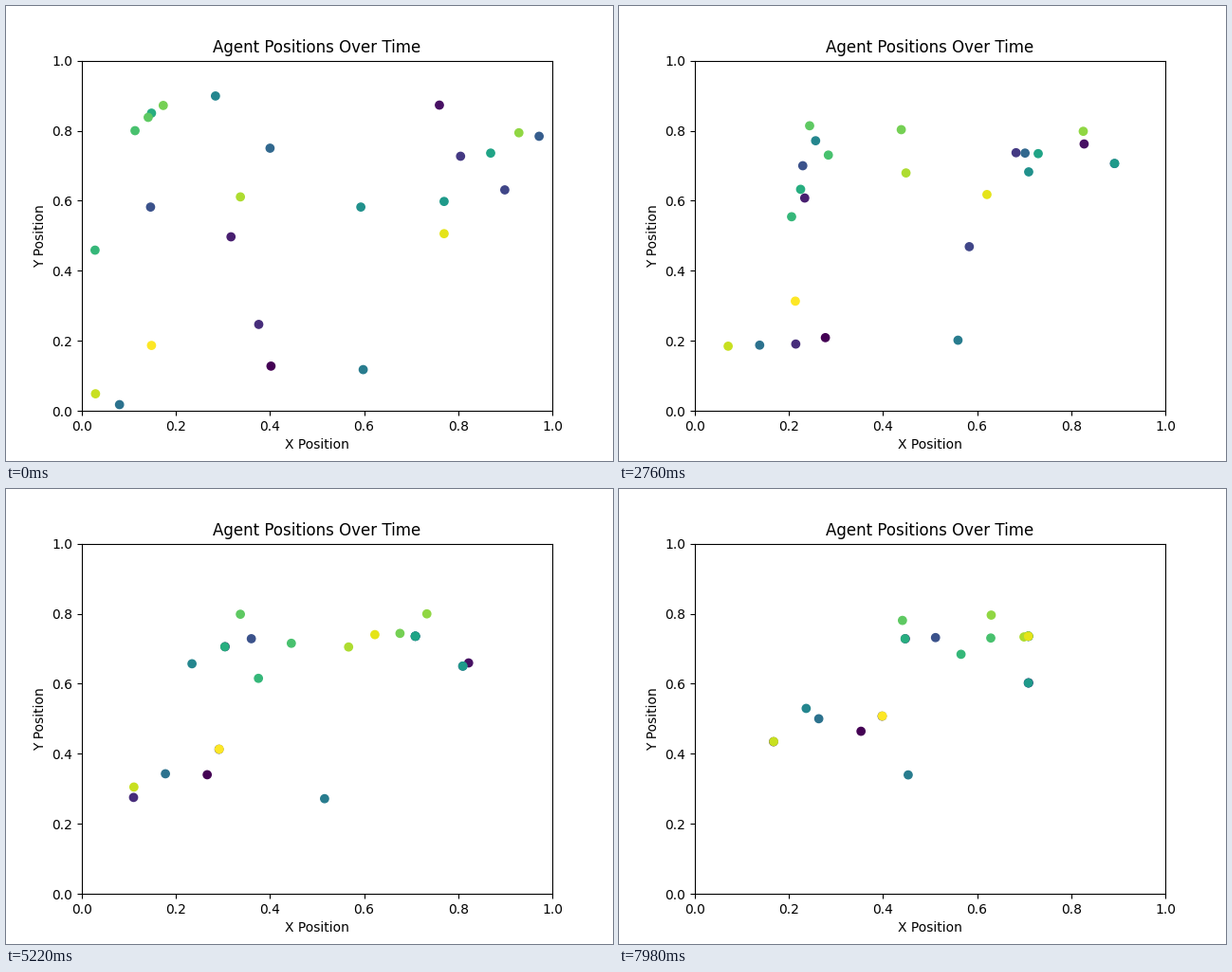
A matplotlib script for the animation above (8000 ms loop, 640 by 480 pixels).

```python
import numpy as np
import matplotlib.pyplot as plt
from matplotlib.animation import FuncAnimation

STEP_MS = 60      # time between two moves
TICK_MS = 40
LOOP_MS = 8000
STEPS = 134
SUBSTEPS = 6      # keeps a follower close behind its prey

# Starting conditions only; all motion follows from the chase rule.
# Each agent: x, y, speed per step, index of the agent it chases
AGENTS = np.array([
    (0.402, 0.128, 0.00332, 24),
    (0.760, 0.873, 0.00299, 13),
    (0.317, 0.497, 0.00316, 6),
    (0.376, 0.247, 0.00375, 22),
    (0.805, 0.727, 0.00372, 8),
    (0.899, 0.631, 0.00772, 24),
    (0.146, 0.582, 0.00329, 19),
    (0.972, 0.784, 0.00243, 0),
    (0.400, 0.750, 0.00657, 14),
    (0.080, 0.018, 0.00391, 2),
    (0.598, 0.118, 0.00201, 11),
    (0.284, 0.899, 0.00284, 9),
    (0.593, 0.582, 0.00340, 14),
    (0.770, 0.598, 0.00490, 7),
    (0.869, 0.736, 0.00303, 4),
    (0.148, 0.850, 0.00502, 2),
    (0.028, 0.459, 0.00440, 8),
    (0.113, 0.800, 0.00401, 23),
    (0.141, 0.838, 0.00230, 8),
    (0.173, 0.872, 0.00597, 4),
    (0.929, 0.794, 0.00225, 18),
    (0.337, 0.611, 0.00295, 8),
    (0.029, 0.049, 0.00309, 11),
    (0.770, 0.506, 0.00406, 19),
    (0.148, 0.187, 0.00310, 21),
])
start = AGENTS[:, :2]
speed = AGENTS[:, 2]
prey = AGENTS[:, 3].astype(int)


def move(pos):
    """Everyone heads for its prey at its own speed, never past it."""
    for _ in range(SUBSTEPS):
        gap = pos[prey] - pos
        dist = np.maximum(np.hypot(*gap.T), 1e-9)
        share = np.minimum(1, speed / SUBSTEPS / dist)
        pos = pos + gap * share[:, None]
    return pos


track = [start]
while len(track) < STEPS:
    track.append(move(track[-1]))

fig, ax = plt.subplots(figsize=(6.4, 4.8), dpi=100)
dots = ax.scatter(*start.T, c=np.arange(len(start)), cmap="viridis")
ax.set(xlim=(0, 1), ylim=(0, 1), title="Agent Positions Over Time",
       xlabel="X Position", ylabel="Y Position")


def update(tick):
    step = (tick * TICK_MS + TICK_MS // 2) // STEP_MS
    dots.set_offsets(track[step])
    return (dots,)


anim = FuncAnimation(fig, update, frames=LOOP_MS // TICK_MS, interval=TICK_MS,
                     init_func=lambda: update(0), repeat=True, repeat_delay=0)
plt.show()
```
